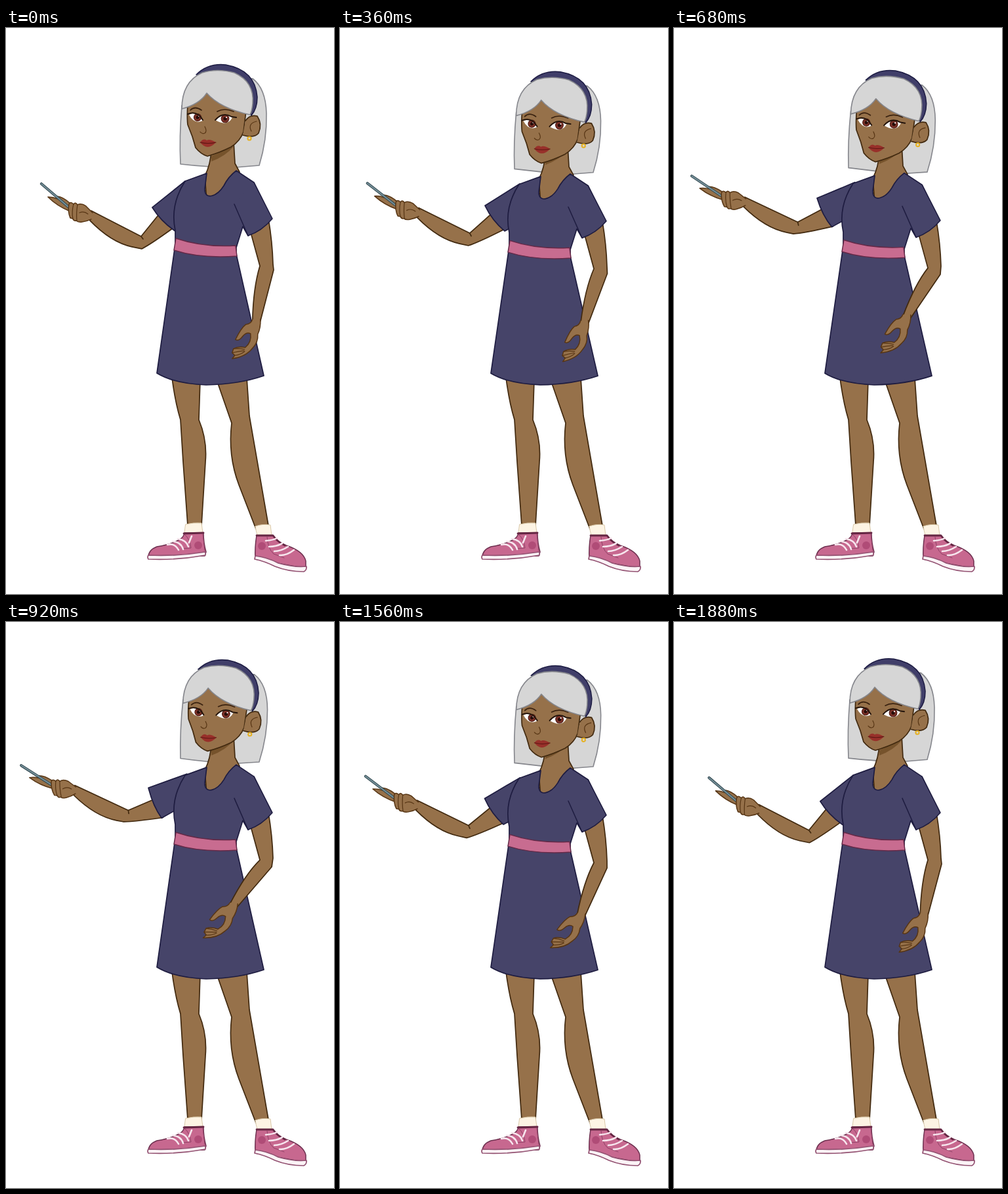
Write an HTML page that moves like this. It is 500x861 px and loops after 1.92 s.

```html
<!DOCTYPE html>
<html lang="en">
<head>
<meta charset="utf-8">
<title>Presenter</title>
<style>
  html, body { margin: 0; width: 100%; height: 100%; overflow: hidden; background: #fff; }
  svg { display: block; width: 100%; height: 100%; }
  path, circle { stroke-linejoin: round; stroke-linecap: round; }
  .skin { fill: #96714a; stroke: #41290f; stroke-width: 1.7; }
  .hand { fill: #96714a; stroke: #573514; stroke-width: 1.5; }
  .navy { fill: #464469; stroke: #1e1c40; stroke-width: 1.7; }
  .hair { fill: #d6d6d6; stroke: #85868c; stroke-width: 1.6; }
  .sock { fill: #fdf4e4; stroke: #d9c8a8; stroke-width: 1; }
  .shoe { fill: #c7688f; stroke: #6e3150; stroke-width: 1.5; }
  .sole { fill: #fbf3f6; stroke: #935272; stroke-width: 1.7; }
  .collar { fill: none; stroke: #652643; stroke-width: 2.8; }
  .lace { fill: none; stroke: #f7e6ee; stroke-width: 2.6; }
  .seam { fill: none; stroke: #8f4266; stroke-width: 1; }
  .badge { fill: #b04c77; }
  .line { fill: none; stroke: #573514; stroke-width: 1.2; }
  .fold { fill: none; stroke: #1e1c40; stroke-width: 1.5; }
  .lash { fill: none; stroke: #24140b; stroke-width: 2; }
  .brow { fill: none; stroke: #3a2210; stroke-width: 1.7; }
  .white { fill: #fff; }
  .iris { fill: #7a3027; stroke: #46150f; stroke-width: 1; }
  .pupil { fill: #260d0a; }
</style>
</head>
<body>
<svg viewBox="0 0 500 861">
  <g id="hairBack"><path id="bob" class="hair"/></g>

  <!-- legs -->
  <path class="skin" d="M253,532 Q258,570 266,596 L270,660 L277,757 H298 L304,660 Q307,627 294,596 L296,535Z"/>
  <path class="skin" d="M321,535 L344,601 Q338,650 355,695 L381,762 L400,757 L371,590 L367,532Z"/>
  <path class="sock" d="M274,755 Q286,752 298,753 L300,768 L272,770Z"/>
  <path class="sock" d="M380,758 Q391,754 403,756 L405,772 L384,774Z"/>

  <!-- shoes -->
  <g>
    <path class="shoe" d="M272,768 L301,768 Q301,783 305,797 L303,803 L217,805 Q217,794 230,789 Q251,786 263,779 Q271,775 272,768Z"/>
    <path class="sole" d="M217,802 Q260,804 304,797 L304,802 Q260,810 217,808 Q215,805 217,802Z"/>
    <path class="collar" d="M271,769 L301,768"/>
    <path class="seam" d="M272,770 Q281,778 282,791 L268,792 M300,770 L303,795"/>
    <path class="lace" d="M246,786 Q257,783 263,794 M254,781 Q267,782 270,793 M262,777 Q275,779 278,789 M279,783 L283,773"/>
    <circle class="badge" cx="293" cy="787" r="6"/>
  </g>
  <g>
    <path class="shoe" d="M382,772 L407,772 Q414,782 427,787 Q454,796 457,811 L457,822 L380,808 Q379,790 382,772Z"/>
    <path class="sole" d="M380,803 Q398,805 415,814 Q440,821 458,819 Q459,824 454,827 Q430,827 410,819 Q394,811 379,808Z"/>
    <path class="collar" d="M382,772 L407,772 Q414,782 425,787"/>
    <path class="seam" d="M398,774 Q399,792 408,800 L424,806"/>
    <path class="lace" d="M396,780 Q408,779 413,776 M401,789 Q412,789 421,784 M409,796 Q419,796 430,789 M417,802 Q427,803 439,794"/>
    <circle class="badge" cx="390" cy="788" r="6"/>
  </g>

  <!-- raised arm -->
  <path id="armL" class="skin"/>
  <g id="handL">
    <path class="hand" d="M98,279 Q78,271 64,257 Q72,257 79,260 L78,256 Q87,257 97,266 L104,274Z"/>
    <path d="M54,237 L95,272" stroke="#31474f" stroke-width="4" fill="none"/>
    <path d="M54,237 L95,272" stroke="#748f98" stroke-width="2" fill="none"/>
    <path class="hand" d="M132,281 L122,271 Q115,266 109,269 Q106,264 103,268 Q98,263 96,268 Q94,280 98,289 L102,290 Q103,294 107,293 Q110,296 116,295 Q124,294 130,291"/>
    <path class="line" d="M103,268 Q100,280 102,290 M109,269 Q107,282 108,293 M112,281 Q119,278 125,283"/>
  </g>

  <!-- body -->
  <g id="body">
    <path id="sleeveL" class="navy"/>
    <path class="skin" d="M313,185 Q312,208 303,225 L306,262 H330 L356,219 L349,206 L347,172"/>
    <path d="M313,195 L347,180 Q335,195 313,203Z" fill="#76532c"/>
    <path class="navy" d="M306,221 L273,233 C262,250 251,275 258,308 L258,340 L351,344 L351,334 L361,302 L369,316 L405,290 L378,235 L351,217 Q339,226 332,240 C322,256 303,263 303,245Z"/>
    <path class="navy" d="M257,336 L230,525 Q256,541 305,543 Q355,542 393,529 L351,344Z"/>
    <path d="M259,320 Q300,334 350,331 L352,347 Q296,351 256,338Z" fill="#c86c90" stroke="#642947" stroke-width="1.5"/>
  </g>

  <!-- lowered arm -->
  <path id="armR" class="skin"/>
  <g id="handR">
    <path class="hand" d="M376,443 Q374,450 366,451 Q359,456 350,474 Q355,477 361,469 Q367,462 373,465 Q375,478 365,486 Q354,484 347,488 L345,494 L349,498 L345,503 Q366,500 376,487 Q385,478 384,466 Q389,455 388,443"/>
    <path class="line" d="M347,488 Q356,487 364,489 M345,494 Q355,492 363,491 M349,498 Q358,497 364,492"/>
  </g>
  <g id="cuffR">
    <path d="M376,236 L378,235 L406,290 Q390,309 369,316 L348,268Z" fill="#464469"/>
    <path class="fold" d="M378,235 L406,290 Q390,309 369,316 L348,268"/>
  </g>

  <!-- head -->
  <g id="head">
    <path class="skin" d="M279,94 Q275,130 277,147 L284,165 L289,182 Q297,192 307,195 Q325,190 343,181 Q357,172 362,158 L370,94Z"/>
    <path class="skin" d="M365,141 Q372,131 383,134 Q391,146 385,160 Q378,168 361,163"/>
    <path class="line" d="M374,157 Q368,145 382,142"/>
    <circle cx="371" cy="168" r="2.6" fill="none" stroke="#e6b122" stroke-width="2"/>
    <g id="features">
      <path class="white" d="M279,132 Q291,125 300,141 Q287,147 279,132Z"/>
      <circle class="iris" cx="292" cy="136" r="5.6"/><circle class="pupil" cx="292" cy="136" r="2.5"/>
      <circle class="white" cx="294" cy="134" r="1.1"/>
      <path class="lash" d="M277,131 Q291,125 300,140"/>
      <path class="white" d="M319,140 Q330,126 345,136 Q338,151 319,140Z"/>
      <circle class="iris" cx="334" cy="138" r="5.9"/><circle class="pupil" cx="334" cy="138" r="2.6"/>
      <circle class="white" cx="336" cy="136" r="1.1"/>
      <path class="lash" d="M319,140 Q330,127 344,135 L351,136"/>
      <path class="brow" d="M281,125 Q288,118 298,125 M322,127 Q333,121 347,127"/>
      <path class="line" d="M303,150 Q307,157 303,160 Q299,162 296,158"/>
      <path d="M296,174 Q301,167 306,171 Q310,168 320,174 Q307,188 296,174Z" fill="#98302a"/>
      <path d="M296,174 Q308,177 320,174" fill="none" stroke="#5c1814" stroke-width="1"/>
    </g>
    <path d="M290,71 Q308,53 335,56 Q380,64 383,105 Q383,123 374,133 L366,110 L340,70Z" fill="#403e69" stroke="#1c1b42" stroke-width="1.5"/>
    <path class="hair" d="M268,123 Q268,82 299,68 Q322,61 348,68 Q379,82 376,115 Q375,126 372,132 Q326,122 306,99 Q295,116 268,123Z"/>
  </g>
</svg>
<script>
const LOOP = 1920, STEP = 40;
const $ = id => document.getElementById(id);
const place = (id, value) => $(id).setAttribute("transform", value);

// 0 at the given delay, 1 half a period later
const wave = (t, period, delay = 0) =>
  (1 - Math.cos((t - delay) / period * 2 * Math.PI)) / 2;

function turn([x, y], [cx, cy], deg) {
  const a = deg * Math.PI / 180, c = Math.cos(a), s = Math.sin(a);
  return [cx + (x - cx) * c - (y - cy) * s, cy + (x - cx) * s + (y - cy) * c];
}

// path text with every point passed through a mapping
const bend = (map, text) => text.replace(/(-?[\d.]+),(-?[\d.]+)/g,
  (_, x, y) => map([+x, +y]).map(v => v.toFixed(2)).join());

const hinge = (id, from, to, deg) =>
  place(id, `translate(${to[0] - from[0]} ${to[1] - from[1]}) rotate(${deg} ${from})`);

const SHOULDER = [258, 262], ELBOW_L = [206, 326], WRIST_L = [128, 286];
const ELBOW_R = [397, 364], WRIST_R = [382, 447];

function draw(t) {
  const dip = wave(t, LOOP / 2), swing = wave(t, LOOP, 50);
  // the raised arm lingers a little near the top
  const reach = wave(t, LOOP, 25) + .08 * wave(t, LOOP / 2, 25);
  const lower = ([x, y]) => [x, y + 5 * dip];

  // torso sinks towards the hem
  const squash = `translate(0 540) scale(1 ${1 - .018 * dip}) translate(0 -540)`;
  place("body", squash);
  place("cuffR", squash);

  const nod = `translate(0 ${12 * dip + 1.6 * reach}) rotate(${1.2 * reach} 325 205)`;
  place("head", nod);
  place("hairBack", nod);
  place("features", `translate(0 ${-dip})`);
  const left = 207 - 3.5 * dip, right = 209 - dip + reach;
  $("bob").setAttribute("d",
    `M268,118 Q264,165 266,${left} Q308,${left + 5} 350,${right + 3} L386,${right} ` +
    `Q398,170 397,130 Q396,92 376,77 L300,80Z`);

  // raised arm
  const upper = p => lower(turn(p, SHOULDER, 28 * reach));
  const elbow = upper(ELBOW_L);
  const fore = p => turn(p, ELBOW_L, -1.5 * reach).map((v, i) => v + elbow[i] - ELBOW_L[i]);
  $("armL").setAttribute("d",
    bend(upper, "M240,275 L206,317") + bend(fore, "L130,278 L128,293 Q160,326 192,333") +
    bend(upper, "L207,336 Q221,329 258,302") + bend(upper, "M206,317 L209,321"));
  hinge("handL", WRIST_L, fore(WRIST_L), -8 * reach);

  const mix = (a, b) => a.map((v, i) => v + (b[i] - v) * reach);
  $("sleeveL").setAttribute("d",
    `M${mix([273, 233], [276, 231])} L${mix([223, 273], [217, 252])} ` +
    `Q${mix([236, 294], [224, 280])} ${mix([258, 309], [237, 298])} ` +
    `L${mix([264, 306], [262, 284])} L282,240Z`);

  // lowered arm
  const hang = p => lower(turn(p, ELBOW_R, 27 * swing));
  $("armR").setAttribute("d",
    bend(lower, "M370,300 L387,362") + bend(hang, "Q377,395 376,446 L388,446 L408,368") +
    bend(lower, "L407,359 Q406,325 400,290Z"));
  hinge("handR", WRIST_R, hang(WRIST_R), 15 - 19 * wave(t, LOOP, 1250));
}

function tick() {
  draw(Math.floor(performance.now() % LOOP / STEP) * STEP);
  requestAnimationFrame(tick);
}
tick();
</script>
</body>
</html>
```
